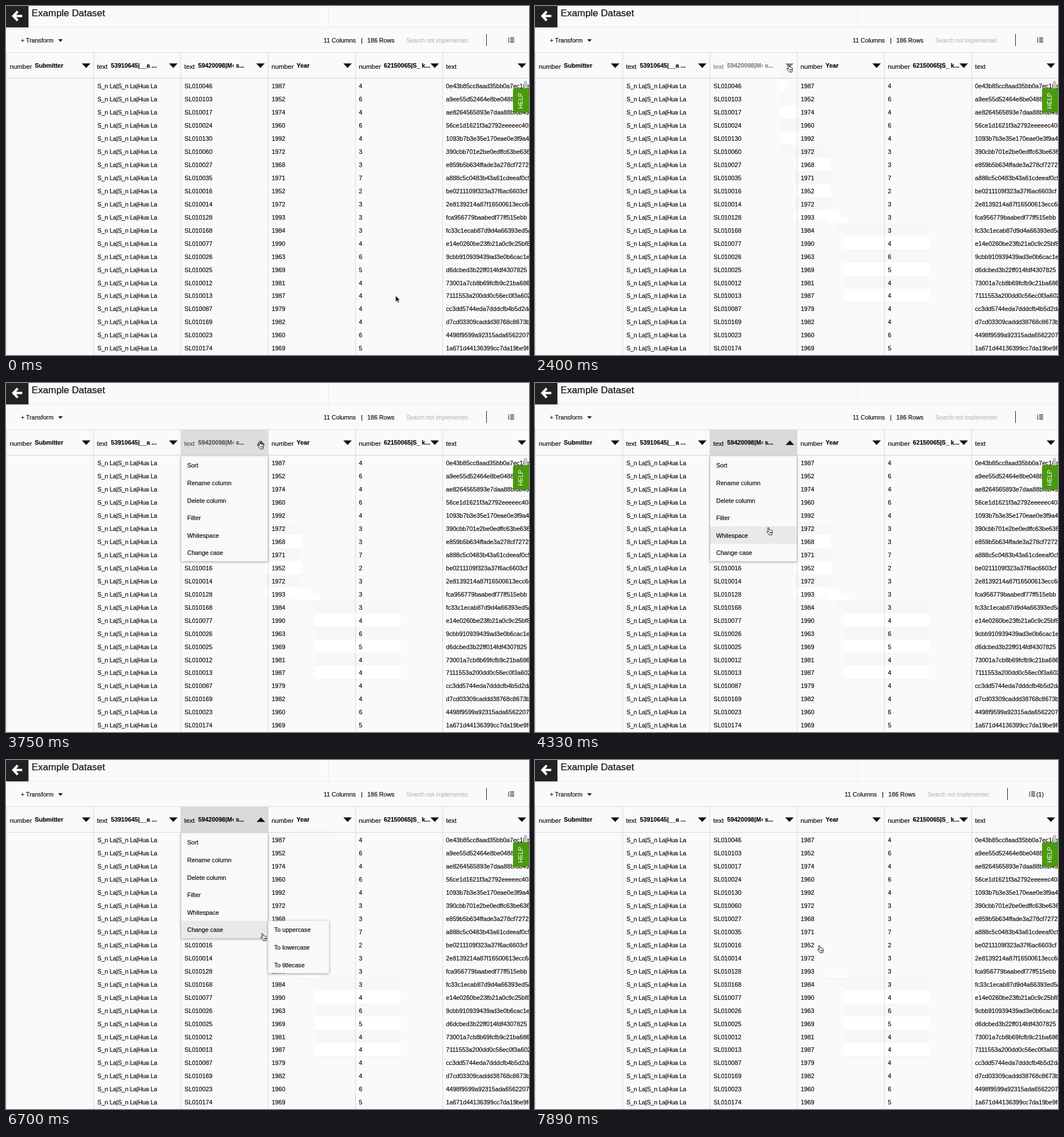
Recreate the animation shown at these times as an HTML page. Size 917 by 611 pixels, loop 8000 ms.

```html
<!DOCTYPE html>
<html lang="en">
<head>
<meta charset="utf-8">
<title>Dataset table</title>
<style>
html, body { margin: 0; width: 100%; height: 100%; overflow: hidden; background: #fafafa; }
svg { display: block; width: 917px; height: 611px; }
text { font: 10.7px "Liberation Sans", Arial, sans-serif; fill: #0a0a0a; stroke: #0a0a0a; stroke-width: .18px; white-space: pre; }
.title { font-size: 16.9px; }
.type { font-size: 11.5px; }
.name { font-weight: bold; }
.place { letter-spacing: -.15px; }
.search { font-size: 10.15px; fill: #aeaeae; stroke: none; }
.help { fill: #fff; stroke: none; text-anchor: middle; }
.tiny { font-size: 4px; }
.panel { fill: #f8f9fb; filter: drop-shadow(0 1px 2px rgba(0, 0, 0, .4)); }
</style>
</head>
<body>
<svg id="stage" viewBox="0 0 917 611" xmlns="http://www.w3.org/2000/svg"></svg>
<script>
const LOOP = 8000, TICK = 148.8;
const ROW = 22.94, TOP = 128, ITEM = 30.6, COLUMN = 153;
// events, counted in ticks
const HAND = 10, FADE = 13, OPEN = 18, LEAVE = 26, SUB = 30, CLOSE = 53;
const stage = document.getElementById('stage');

const headers = [
  'number Submitter', 'text 53910645|__a ...', 'text 59420098|M‹ s...',
  'number Year', 'number 62150065|S_ k...', 'text '
];
const codes = '046 103 017 024 130 060 027 035 016 014 128 168 077 026 025 012 013 087 169 023 174'.split(' ');
const years = '87 52 74 60 92 72 68 71 52 72 93 84 90 63 69 81 87 79 82 60 69'.split(' ');
const counts = '464643372333465444465';

let seed = 7;
const random = () => (seed = (seed * 16807) % 2147483647) / 2147483647;
const hash = () => Array.from({ length: 26 }, () => Math.floor(random() * 16).toString(16)).join('');

// pointer path: tick, x, y
const path = [
  [0, 683, 507], [1, 541, 381], [3, 511, 359], [4, 511, 359], [5, 455, 242],
  [6, 430, 175], [8, 428, 131], [12, 441, 102], [25, 441, 102], [30, 397, 290],
  [42, 397, 290], [45, 446, 303], [48, 524, 307], [50, 495, 324]
];

function pointer(tick) {
  const next = path.findIndex(p => p[0] > tick);
  if (next < 0) return path.at(-1).slice(1);
  const [a, ...from] = path[next - 1], [b, ...to] = path[next];
  return from.map((v, i) => v + (to[i] - v) * (tick - a) / (b - a));
}

const text = (x, y, s, cls = '', extra = '') => `<text x="${x}" y="${y}" class="${cls}" ${extra}>${s}</text>`;
const rect = (x, y, w, h, fill, extra = '') =>
  `<rect x="${x}" y="${y}" width="${w}" height="${h}" fill="${fill}" ${extra}/>`;
const tri = (x, y, w, h, extra = '') =>
  `<path d="M${x - w / 2} ${y - h / 2}h${w}l${-w / 2} ${h}z" fill="#111" ${extra}/>`;
const from = tick => `data-from="${tick}"`;

// each early pointer move uncovers a striped box around its two ends
function trails() {
  let out = '';
  for (let i = 1; i <= 12; i++) {
    const [x0, y0] = pointer(i - 1), [x1, y1] = pointer(i);
    out += rect(Math.min(x0, x1), Math.min(y0, y1), Math.abs(x1 - x0) + 8,
      Math.abs(y1 - y0) + 14, 'url(#stripes)', from(i));
  }
  return out;
}

function topBar() {
  return rect(39, 37, 878, 1, '#ebebeb') + rect(565.5, 0, 1, 37, '#e6e6e6') +
    rect(0, 0, 39.4, 37.5, '#222') +
    '<path d="M20.5 9.5L13 17.5L20.5 25.5M13 17.5H28.5" fill="none" stroke="#fff" stroke-width="4.2"/>' +
    text(45, 18, 'Example Dataset', 'title') +
    text(26, 63.5, '+ Transform') + tri(95.5, 60.5, 8, 4.5);
}

function tools() {
  const icon = [1, 2, 3].map(n => {
    const y = 52.7 + n * 3.4;
    return rect(884, y - .7, 7, 1.4, '#111') + text(880.3, y + 1.4, n, 'tiny');
  }).join('');
  return '<g id="tools">' + text(557, 63.5, '11 Columns') + text(622.3, 63.5, '|', 'type') +
    text(633.5, 63.5, '186 Rows') +
    '<g clip-path="url(#field)">' + text(702, 63.5, 'Search not implemented', 'search') + '</g>' +
    rect(842, 49, 1, 21, '#222') + icon + text(893, 63.5, '(1)', '', from(CLOSE)) + '</g>';
}

function header(label, i) {
  const [type, ...name] = label.split(' ');
  const x = .5 + COLUMN * i;
  const active = i === 2;
  return `<g ${active ? 'id="active"' : ''}>` + text(x + 6, 109.7, type, 'type') +
    text(x + (type === 'text' ? 30.5 : 50), 108.3, name.join(' '), 'name') +
    tri(140.5 + 152.8 * i, 104.5, 15, 8, active ? 'id="caret"' : '') + '</g>';
}

function row(code, i) {
  const y = (144.4 + i * ROW).toFixed(1);
  const cells = ['S_n La|S_n La|Hua La', 'SL010' + code, '19' + years[i], counts[i], hash()];
  return cells.map((s, c) => text(160.3 + 152.8 * c, y, s, c ? '' : 'place')).join('');
}

function menu(id, x, y, w, items, hover = '') {
  return `<g id="${id}">` + rect(x, y, w, items.length * ITEM, '', 'class="panel"') + hover +
    items.map((s, i) => text(x + 10.7, y + 19.8 + i * ITEM, s)).join('') + '</g>';
}

stage.innerHTML = `<defs>
  <pattern id="stripes" y="${TOP}" width="10" height="${2 * ROW}" patternUnits="userSpaceOnUse">
    ${rect(0, 0, 10, ROW, '#fff') + rect(0, ROW, 10, ROW, '#f5f7f9')}
  </pattern>
  <clipPath id="field"><rect x="700" y="50" width="110.2" height="20"/></clipPath>
</defs>` +
  rect(0, 0, 917, 611, '#fafafa') + trails() +
  rect(303, 82, 160, 233, '#fafafa', from(OPEN)) +
  rect(455, 99, 115, 277, '#f9f9fb', from(SUB)) +
  rect(303, 82, 588, 295, '#fafafa', from(CLOSE)) +
  rect(307, 82, 153, 45, '#d9d9d9', 'id="pressed"') +
  topBar() + tools() +
  rect(0, 81, 917, 1, '#dcdcdc') + rect(0, 126, 917, 1, '#d2d2d2') +
  headers.map((h, i) => rect(.2 + COLUMN * i, 82, 1, 529, '#d8d8d8') + header(h, i)).join('') +
  codes.map(row).join('') +
  rect(908, 131, 6, 16, '#c6c6c6', 'rx="3"') +
  '<path d="M917 144H892q-3 0-3 3V184q0 3 3 3H917z" fill="#4b990e"/>' +
  text(0, 0, 'HELP', 'help', 'transform="translate(905.7 166) rotate(-90)"') +
  menu('menu', 307, TOP + .5, 152,
    ['Sort', 'Rename column', 'Delete column', 'Filter', 'Whitespace', 'Change case'],
    rect(307, 0, 152, ITEM, '#e9e9ea', 'id="hover"')) +
  menu('submenu', 459.5, 281.5, 107, ['To uppercase', 'To lowercase', 'To titlecase']) +
  `<path id="arrow" d="M0 0V11.2L2.6 8.8L4.4 13L6.4 12.2L4.7 8.1H8.2Z" fill="#111" stroke="#fff" stroke-width=".8"/>
  <path id="hand" d="M2.2 1.2q1.3-1.6 2.1.2l.8 3.5q1.2-.9 1.8.3 1.2-.6 1.7.5 1.4-.4 1.6 1l.4 2.8q0 1.6-.9 2.6v1.4h-5q-.6-1.6-2.6-3.4l-1.7-2.3q.3-1.5 2-.5l1.2.9z
    M5.8 8.5v2.4M7.4 8.5v2.4M8.9 8.5v2.4" fill="#fff" stroke="#111" stroke-width=".95" stroke-linejoin="round"/>`;

const $ = id => document.getElementById(id);
const show = (el, on) => el.setAttribute('visibility', on ? 'visible' : 'hidden');
const later = [...stage.querySelectorAll('[data-from]')];

function headerOpacity(tick) {
  if (tick < FADE || tick >= LEAVE) return 1;
  return tick < OPEN ? Math.max(.5, .8 - .1 * (tick - FADE)) : .65;
}

function render(t) {
  const tick = Math.floor(t / TICK);
  const open = tick >= OPEN && tick < CLOSE;
  const [x, y] = pointer(tick);
  later.forEach(el => show(el, tick >= +el.dataset.from));

  show($('arrow'), tick < HAND);
  show($('hand'), tick >= HAND);
  for (const id of ['arrow', 'hand']) $(id).setAttribute('transform', `translate(${x} ${y})`);

  $('active').style.opacity = headerOpacity(tick);
  $('caret').setAttribute('transform', open ? 'rotate(180 446.5 104.5)' : '');
  show($('pressed'), open);
  $('pressed').style.opacity = tick < LEAVE ? .85 : 1;
  show($('menu'), open);
  show($('submenu'), open && tick >= SUB);

  const item = tick >= SUB ? 5 : Math.floor((y - TOP) / ITEM);
  show($('hover'), open && item >= 0);
  $('hover').setAttribute('y', TOP + .5 + item * ITEM);
  $('tools').setAttribute('transform', `translate(${tick >= CLOSE ? -14 : 0} 0)`);
}

let start;
function play(now) {
  start ??= now;
  render((now - start) % LOOP);
  requestAnimationFrame(play);
}
render(0);
requestAnimationFrame(play);
</script>
</body>
</html>
```
